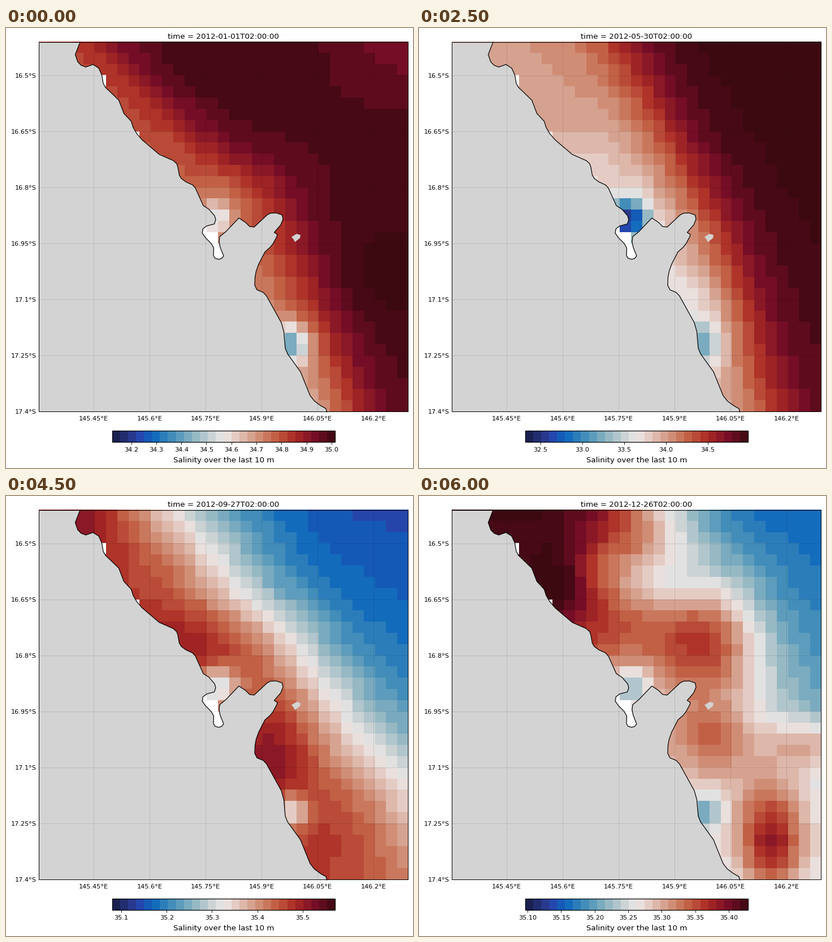
Recreate the animation shown at these times as a matplotlib script. Size 720 by 778 pixels, loop 6500 ms.

```python
import numpy as np
import matplotlib.pyplot as plt
from matplotlib.animation import FuncAnimation
from matplotlib.colors import LinearSegmentedColormap

W, H, DPI = 720, 778, 80
FRAMES, INTERVAL = 13, 500
N = 33
LEFT, TOP, RIGHT, BOTTOM = 58.1, 25.1, 711.4, 678.4
BAR_L, BAR_T, BAR_R, BAR_B = 188, 712, 582, 732
BANDS = 28
LAND = "#d2d3d2"

plt.rcParams["font.family"] = "DejaVu Sans"

# Diverging blue-white-red colour scale
STOPS = [
    (0.0, "#171c42"), (0.091, "#293a8f"), (0.125, "#2546ad"),
    (0.182, "#0b66bd"), (0.273, "#4590b9"), (0.364, "#8eb5c2"),
    (0.455, "#d2d6d7"), (0.5, "#ece9e8"), (0.545, "#e6d2cc"),
    (0.636, "#d59d89"), (0.727, "#c46548"), (0.818, "#ac2b24"),
    (0.909, "#780e28"), (1.0, "#3c0911"),
]
CMAP = LinearSegmentedColormap.from_list("salinity", STOPS, N=560)

ROW, COL = np.mgrid[0:N, 0:N].astype(float)
OFFSHORE = COL - 4 - 0.66 * ROW  # cells east of the slanting coast


def along(values):
    """A quantity given at the north, middle and south of the map."""
    return np.interp(ROW, [0, 16, 32], values)


def front(near, far, reach, width):
    """Level changing from the coast to the open sea, `reach` cells out."""
    near, far, reach = along(near), along(far), along(reach)
    return near + (far - near) / (1 + np.exp((reach - OFFSHORE) / width))


def patch(col, row, wide, tall, rise):
    return rise * np.exp(-((COL - col) / wide) ** 2 / 2
                         - ((ROW - row) / tall) ** 2 / 2)


def rivers(bay, mouth):
    """Fresh water from the two rivers."""
    return -patch(15.3, 15.3, 1.2, 1.2, bay) - patch(22, 26.5, 1.2, 1.2, mouth)


jan = (front((20, 20, 14), (26.5, 26.7, 27), (1.5, 7.5, 1.5), 2)
       + rivers(7, 10)
       + patch(16, 1, 6, 4, 0.9) + patch(32, 0, 4, 2.5, -1.5)
       + patch(30, 20, 4, 4, 1.4) + patch(18.5, 12.5, 3, 2, -1.8))
mar = (front((15.5, 14, 9), (27.7, 27.5, 25.5), (5, 9, 3), 3.2)
       + rivers(4, 5)
       + patch(10, 8, 4, 4, 1.8) + patch(22, 24, 3.5, 4, -4)
       + patch(20.5, 13.5, 3, 2, -2.5))
may = (front((17, 13, 13.5), (28, 27.8, 27), (10.8, 7.8, 1.8), 2.3)
       + rivers(13, 6)
       + patch(8, 6, 3, 3, 1.3) + patch(22, 24, 2.5, 3, -2.3))
jul = (front((23, 22.8, 23), (5.5, 15.5, 27), (18, 14, 2), 3.2)
       + rivers(4, 8)
       + patch(4, 0, 2, 3, 2.5) + patch(10, 9, 4, 4, -2)
       + patch(26, 22, 5, 3, 2.2) + patch(28.5, 29, 2.8, 4, 3.5)
       + patch(22.8, 25.2, 2, 2, -9))
aug = (front((18.5, 22.5, 19), (6.5, 8.5, 9.5), (12, 11, 7.5), 3)
       + rivers(11, 11)
       + patch(4, 0, 2, 3, 5) + patch(14.5, 11.5, 4.5, 2.5, 6)
       + patch(21, 9, 4, 4, 1.8))
octo = (front((27, 20, 24.5), (0, 2.5, 19), (6.8, 11, 8.5), 3)
        + rivers(5, 5)
        + patch(18, 1, 4, 4, 3) + patch(18, 7, 4, 4, -4)
        + patch(16, 15.5, 2, 2, -3.5) + patch(20.5, 21, 2.5, 3.5, 7)
        + patch(27, 27, 4, 3, 2.8))
dec = (front((28, 18, 13), (4.5, 7, 13), (13.5, 12, 12), 3)
       + rivers(5, 6)
       + patch(8.5, 7, 2.5, 3, 5) + patch(13, 4.5, 2, 2, -3)
       + patch(18, 6, 3, 2, -5.5) + patch(23, 11, 3, 3.5, 6.5)
       + patch(23, 20, 2, 2, 4) + patch(31.5, 20.5, 2.5, 1.5, 5)
       + patch(16, 15.5, 2, 2, -3) + patch(28, 29.2, 2, 3.5, 10))

# Step of each known month and the range of its colour bar
STEPS = [0, 2, 5, 7, 8, 10, 12]
LEVELS = np.array([jan, mar, may, jul, aug, octo, dec])
SPANS = np.array([
    (34.1244, 35.0135), (32.026, 34.772), (32.321, 34.979),
    (34.9242, 35.3566), (35.0218, 35.4658), (35.1386, 35.6765),
    (35.0966, 35.4287)])

NO_DATA = (((COL == 5) & (ROW == 3)) | ((COL == 8) & (ROW == 8))
           | ((COL >= 14) & (COL <= 16) & (ROW >= COL + 2) & (ROW < 21)))

# Coastline in stage pixels
NORTH = [
    (131, 25), (122.5, 47), (127, 60), (133, 66), (141, 69), (154, 64.5),
    (164, 71), (169.5, 83), (172, 98), (176, 105), (199.5, 127.5),
    (208.5, 151), (221.5, 165), (225, 176), (231.5, 187), (241, 198),
    (271, 223.5), (296, 234.5), (302, 240), (304, 246), (306.5, 260),
    (310, 266), (318, 272), (330, 277.5), (335, 283), (349, 314),
    (359, 320.5), (369, 332), (371, 339), (368.5, 346.5), (355, 350),
    (348.5, 355), (347, 362.5),
]
SOUTH = [
    (353, 371), (363, 381), (367.5, 389), (367, 402), (369.5, 407),
    (376, 409), (381.5, 407.5), (385, 403), (379, 388), (377, 378),
    (378, 369), (389, 360), (412, 336), (424, 344), (431, 351), (439, 352),
    (462, 330.5), (468, 327.5), (478, 327), (488.5, 330.5), (490, 338),
    (486, 348), (474.5, 361.5), (480, 365), (479, 369), (472, 382),
    (467, 388), (458, 396), (447, 417.5), (442.5, 430), (440.5, 441),
    (440, 455), (444, 463), (455, 467.5), (461, 474), (487, 521),
    (491.5, 537), (494, 566), (498, 576), (521, 608), (538, 650),
    (545.5, 659.5), (557, 668), (566, 673), (567.5, 679),
]
ISLAND = [(505, 369.5), (514, 364), (521, 366), (520, 371.5), (511, 378.5),
          (509, 374)]
COAST = NORTH + SOUTH


def blend(values, i):
    """Ease between the known months on either side of step i."""
    j = min(np.searchsorted(STEPS, i, "right"), len(STEPS) - 1)
    part = (i - STEPS[j - 1]) / (STEPS[j] - STEPS[j - 1])
    return values[j - 1] * (1 - part) + values[j] * part


def field(i):
    bands = np.clip(np.round(blend(LEVELS, i)), 0, BANDS)
    return np.ma.array(bands, mask=NO_DATA)


def ticks(lo, hi):
    rough = (hi - lo) / 9
    mag = 10 ** np.floor(np.log10(rough))
    step = next(m * mag for m in (1, 2, 2.5, 5, 10) if m * mag >= rough)
    digits = next(d for d in (1, 2, 3) if abs(round(step, d) - step) < 1e-9)
    values = np.arange(np.ceil(lo / step), np.floor(hi / step) + 1) * step
    xs = BAR_L + (values - lo) / (hi - lo) * (BAR_R - BAR_L)
    return xs, [f"{v:.{digits}f}" for v in values]


fig = plt.figure(figsize=(W / DPI, H / DPI), dpi=DPI, facecolor="white")
ax = fig.add_axes([0, 0, 1, 1])
scale = dict(cmap=CMAP, vmin=-0.5, vmax=BANDS - 0.5, aspect="auto",
             interpolation="nearest", zorder=1)
sea = ax.imshow(field(0), extent=(LEFT, RIGHT, BOTTOM, TOP), **scale)
ax.imshow(np.arange(BANDS)[None], extent=(BAR_L, BAR_R, BAR_B, BAR_T), **scale)
ax.set_xlim(0, W)
ax.set_ylim(H, 0)
ax.axis("off")


def label(x, y, text, size=10.1, ha="center"):
    return ax.text(x, y, text, size=size, ha=ha, va="baseline")


def outline(x0, y0, x1, y1, width):
    ax.add_patch(plt.Rectangle((x0, y0), x1 - x0, y1 - y0, fill=False,
                               ec="black", lw=width, zorder=5))


ax.fill(*zip(*COAST, (LEFT, BOTTOM), (LEFT, TOP)), color=LAND, lw=0, zorder=2)
ax.fill(*zip(*ISLAND), color=LAND, lw=0, zorder=2)
grid_line = dict(color="black", alpha=0.12, lw=0.8, zorder=3)
for k in range(7):
    y = 84.2 + 99 * k
    label(53.3, y + 4, f"{16.5 + 0.15 * k:.4g}°S", ha="right")
    if k < 6:
        x = 154.8 + 99 * k
        label(x, 694, f"{145.45 + 0.15 * k:.5g}°E")
        ax.plot([LEFT, RIGHT], [y, y], **grid_line)
        ax.plot([x, x], [TOP, BOTTOM], **grid_line)
ax.plot(*zip(*COAST), color="black", lw=1.1, zorder=4)
outline(LEFT, TOP, RIGHT, BOTTOM, 0.9)
outline(BAR_L, BAR_T, BAR_R, BAR_B, 1.1)

MIDDLE = (LEFT + RIGHT) / 2
title = label(MIDDLE, 18.7, "", 12.1)
label(MIDDLE, 768, "Salinity over the last 10 m", 12.1)
marks, = ax.plot([], [], color="black", lw=0.8, zorder=5)
numbers = [label(0, 749, "") for _ in range(12)]
START = np.datetime64("2012-01-01T02:00:00")


def update(i):
    sea.set_data(field(i))
    title.set_text(f"time = {START + np.timedelta64(30 * i, 'D')}")
    xs, names = ticks(*blend(SPANS, i))
    marks.set_data(np.repeat(xs, 3), np.tile([BAR_B, BAR_B + 4, np.nan], len(xs)))
    for k, number in enumerate(numbers):
        used = k < len(xs)
        number.set_text(names[k] if used else "")
        number.set_x(xs[k] if used else 0)
    return [sea, title, marks, *numbers]


anim = FuncAnimation(fig, update, frames=FRAMES, interval=INTERVAL,
                     repeat=True, repeat_delay=0, blit=False)
plt.show()
```
